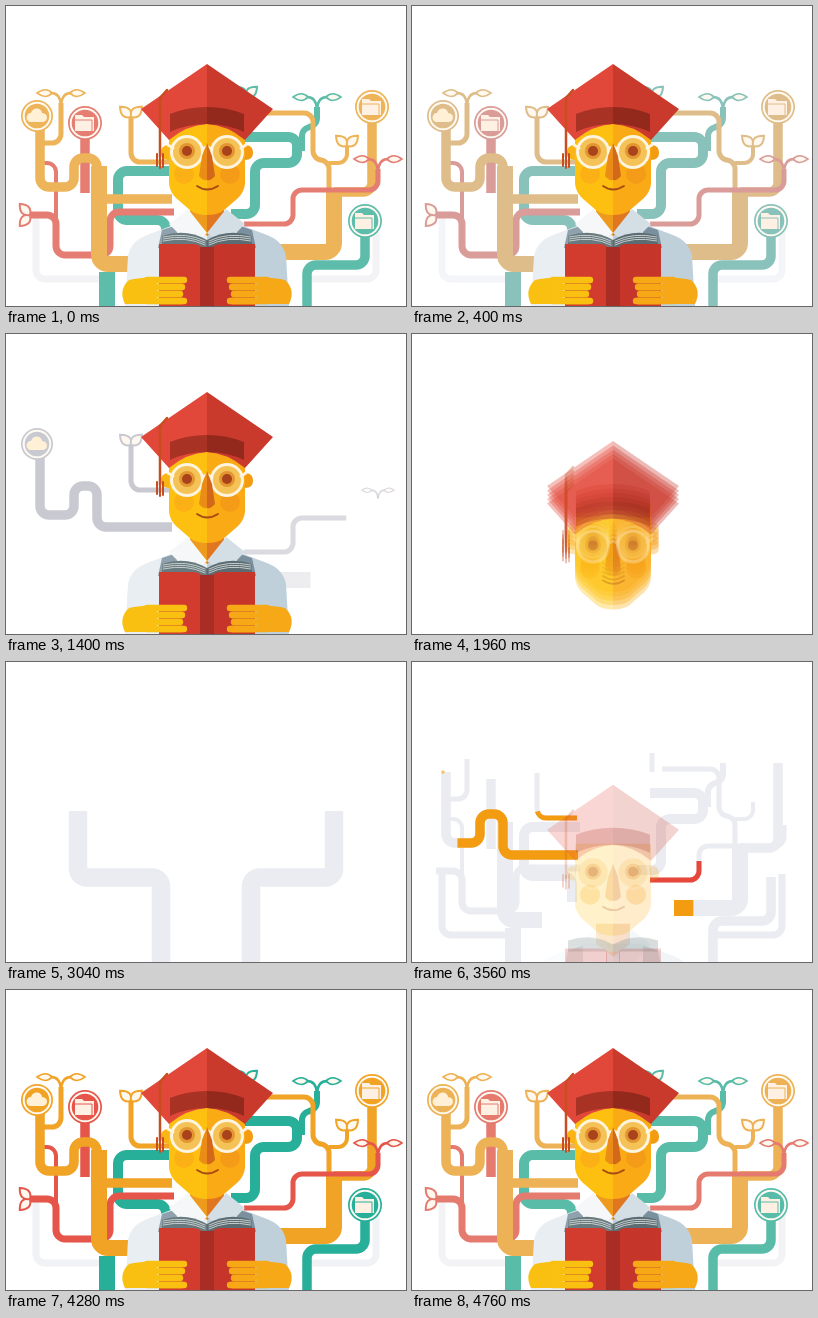
Recreate the animation shown at these times as an HTML page with a canvas. Size 400x300 px, loop 4800 ms.

```html
<!DOCTYPE html>
<html lang="en">
<head>
<meta charset="utf-8">
<title>Learning tree</title>
<style>
html, body { margin: 0; width: 100%; height: 100%; overflow: hidden; background: #fff; }
canvas { display: block; width: 400px; height: 300px; }
</style>
</head>
<body>
<canvas id="stage" width="400" height="300"></canvas>
<script>
const ctx = document.getElementById('stage').getContext('2d');
const LOOP = 4800, HALF = 2400, AXIS = 201;
const PALE = '#ebecf1', GREY = [201, 201, 209], LIGHT = [225, 222, 214];
const THICK = 16, MID = 9.5, THIN = 5;
const hues = { tan: [243, 156, 18], pink: [231, 70, 58], teal: [18, 170, 146] };

const clamp = v => Math.max(0, Math.min(1, v));
const span = (t, a, b) => clamp((t - a) / (b - a));
const easeOut = p => 1 - (1 - p) * (1 - p);
const mix = (a, b, p) => a.map((v, i) => v + (b[i] - v) * p);

// Vivid when grown, washed out by the end of the loop, grey before retracting
function hueAt(name, t) {
  const wash = t < HALF ? 1 : span(t, 4080, LOOP);
  const grey = t < HALF ? span(t, 120, 800) : 0;
  const rgb = mix(mix(hues[name], LIGHT, .36 * wash), GREY, grey);
  return `rgb(${rgb.map(Math.round)})`;
}

// Corners of a right-angled route; the turns alternate between x and y
function route(x, y, ...turns) {
  return [[x, y], ...turns.map((v, i) => i % 2 ? [x, y = v] : [x = v, y])];
}

const pipes = [];
const pipe = (hue, width, cap, ...turns) => pipes.push({ hue, width, cap, points: route(...turns) });

// In order of growth; retraction goes the other way
pipe('tan', MID, 'cloud', 166, 193, 91, 152, 68, 181, 34, 110);
pipe('tan', THIN, 'narrow', 165, 156, 125, 111);
pipe('pink', THIN, 'wide', 238, 218, 287, 184, 372, 163);
pipe('tan', THICK, '', 262, 246, 328, 186);
pipe('tan', THICK, '', 130, 258, 93, 160);
pipe('pink', 7, 'side', 168, 206, 104, 249, 50, 209, 24);
pipe('pink', MID, 'folder', 79, 187, 79, 117);
pipe('teal', 10, '', 160, 240, 160, 214, 112, 165, 168);
pipe('teal', 10, '', 225, 208, 249, 157, 291, 131, 238);
pipe('tan', THIN, 'wide', 34, 137, 55, 97);
pipe('teal', THICK, '', 101, 300, 101, 266);
pipe('pink', 4, '', 50, 214, 50, 157, 36);
pipe('tan', MID, 'folder', 328, 186, 366, 101);
pipe('tan', THIN, '', 323, 200, 323, 154, 307, 107, 250);
pipe('tan', 4, 'narrow', 323, 157, 341, 140);
pipe('teal', MID, 'folder', 301, 300, 301, 259, 359, 215);
pipe('teal', 6, 'wide', 296, 145, 296, 121, 311, 101);
pipe('teal', THIN, 'narrow', 240, 110, 240, 91);

function growth(i, t) {
  if (t >= HALF) return easeOut(span(t, 3440 + i * 32, 3740 + i * 32));
  const end = 960 + 500 * (1 - i / pipes.length) ** 2;
  return 1 - span(t, end, end + 140);
}

function strokeRoute(points, color, width, p) {
  if (p <= 0) return;
  let length = 0;
  ctx.beginPath();
  ctx.moveTo(...points[0]);
  points.slice(1).forEach(([x, y], i) => {
    const [px, py] = points[i], next = points[i + 2];
    length += Math.hypot(x - px, y - py);
    if (next) ctx.arcTo(x, y, ...next, 9);
    else ctx.lineTo(x, y);
  });
  ctx.setLineDash(p < 1 ? [length * p, 2000] : []);
  ctx.strokeStyle = color;
  ctx.lineWidth = width;
  ctx.stroke();
  ctx.setLineDash([]);
}

function shape(fill, d) {
  ctx.fillStyle = fill;
  ctx.fill(new Path2D(d));
}

function line(color, width, d) {
  ctx.strokeStyle = color;
  ctx.lineWidth = width;
  ctx.stroke(new Path2D(d));
}

function disc(x, y, r, fill) {
  ctx.beginPath();
  ctx.arc(x, y, r, 0, Math.PI * 2);
  ctx.fillStyle = fill;
  ctx.fill();
}

// Runs a drawing once per side of the current origin
function mirrored(paint) {
  for (const side of [-1, 1]) {
    ctx.save();
    ctx.scale(side, 1);
    paint(side);
    ctx.restore();
  }
}

const halves = (left, right, d) => mirrored(side => shape(side < 0 ? left : right, d));

function drawLeaves(kind, color) {
  const wide = kind === 'wide', blade = 'M0 0Q6-9 15 0Q6 9 0 0Z';
  if (kind === 'side') ctx.rotate(-Math.PI / 2);
  mirrored(() => {
    if (wide) {
      line(color, 2.5, 'M0 2Q1-10 10-10');
      ctx.translate(9, -10);
      ctx.scale(1, .75);
    } else {
      ctx.rotate(-.75);
    }
    shape('#fff8ee', blade);
    line(color, 2, blade);
  });
}

function drawBadge(icon, color) {
  const r = icon === 'cloud' ? 16 : 17;
  disc(0, 0, r, color);
  disc(0, 0, r - 1.7, '#fffaf2');
  disc(0, 0, r - 3.7, color);
  if (icon === 'cloud') {
    shape('#fff0d6', 'M-7 6C-13 4-10-4-6-3C-4-10 5-8 5-3C12-3 11 6 6 6Z');
  } else {
    shape('#fff0e4', 'M-10-8H-3L-1-6H9V8H-10Z');
    line(color, 1, 'M-10-3H7V8');
  }
}

function drawCap({ cap, hue, points }, p, t) {
  if (!cap || p <= 0) return;
  const badge = cap === 'cloud' || cap === 'folder';
  ctx.save();
  ctx.translate(...points[points.length - 1]);
  if (cap === 'cloud') ctx.translate(-3, 0);
  ctx.scale(p, p);
  (badge ? drawBadge : drawLeaves)(cap, hueAt(hue, t));
  ctx.restore();
}

function drawPipes(t) {
  const order = pipes.map((item, i) => ({ ...item, p: growth(i, t) })).reverse();
  for (const { points, hue, width, p } of order) {
    ctx.globalAlpha = t < HALF ? p : 1;
    strokeRoute(points, hueAt(hue, t), width, p);
  }
  for (const item of order) {
    ctx.globalAlpha = t < HALF ? item.p : 1;
    drawCap(item, t < HALF ? item.p : span(item.p, .6, 1), t);
  }
  ctx.globalAlpha = 1;
}

function drawPale(t) {
  ctx.save();
  if (t >= HALF) {
    ctx.globalAlpha = 1 - span(t, 4080, 4400);
    pipes.forEach(({ points, width }) =>
      strokeRoute(points, PALE, width, easeOut(span(t, 3040, 3540))));
  }
  ctx.translate(200, 0);
  const trunk = easeOut(span(t, 2400, 2960));
  const traces = t < HALF ? 1 : easeOut(span(t, 3120, 3600));
  const lasting = t < HALF ? .6 * (1 - span(t, 300, 1100)) : 1 - .4 * span(t, 3900, 4400);
  mirrored(() => {
    ctx.globalAlpha = 1 - span(t, 3240, 3520);
    if (t >= HALF) strokeRoute(route(45, 300, 45, 215.5, 128, 149), PALE, 18.5, trunk);
    ctx.globalAlpha = lasting;
    strokeRoute(route(100, 273, 170, 212), PALE, 7, traces);
  });
  ctx.restore();
}

function drawBody() {
  halves('#e8eef2', '#bfd0da', 'M0 217H28L60 229Q76 235 79 250L82 300H0Z');
  halves('#8fa1ad', '#7b909e', 'M30 219L45 224L49 242H30Z');
  halves('#ee9a1c', '#e0761f', 'M0 197H17V217L0 230Z');
  halves('#f5f7f8', '#d3dee5', 'M19 203L0 227L16 240L38 218Z');
}

function drawHead() {
  halves('#fbb416', '#f39c12', 'M36 139H40Q46 140 46 147Q46 154 38 154Z');
  halves('#fdc010', '#f9aa14', 'M0 117H38V178Q37 186 31 192L16 205Q10 209 0 209Z');
  mirrored(side => {
    disc(23, 168, 10, side < 0 ? '#fbb016' : '#f49c18');
    disc(20, 146, 15, '#f4c257');
    disc(20, 145, 8, '#e3952f');
    disc(20, 145, 5, '#a8431c');
    line('#fff4dd', 3, 'M4.5 146A15.5 15.5 0 1 1 35.5 146A15.5 15.5 0 1 1 4.5 146M5 143L0 141M34 142L39 139');
  });
  halves('#ea8c17', '#d2691a', 'M0 137L5 150L8 170Q4 175 0 174Z');
  line('#a54b16', 1.8, 'M-10 180Q0 187 11 180');
  // Cap and tassel
  halves('#e2483a', '#c93a2d', 'M0 58L66 103L38 134Q20 119 0 118Z');
  halves('#a83224', '#93291d', 'M0 101Q20 101 37 108V126Q20 118 0 118Z');
  line('#c84d20', 2.5, 'M-40 84L-47 92V151');
  line('#c84d20', 2, 'M-47 149V162M-50 148V160M-44 148V161');
}

function drawBook() {
  halves('#697a7e', '#5c6c72', 'M0 234Q21 222 45 230V241H0Z');
  mirrored(() => {
    for (let y = 231; y < 237; y += 2) line('#c3cccc', 1, `M2 ${y + 4}Q20 ${y - 5} 44 ${y}`);
  });
  halves('#d23c2e', '#c5352a', 'M6 241Q8 238 14 238H48V300H6Z');
  shape('#a92d24', 'M-7 241H7V300H-7Z');
  mirrored(side => {
    const skin = side < 0 ? '#f9c012' : '#f7a816';
    shape(skin, 'M50 271Q70 272 78 274Q89 284 82 298H50Z');
    for (let i = 0; i < 4; i++) {
      const y = 274 + i * 7;
      line(skin, 6.4, `M${23 + i % 3 * 2} ${y}H60`);
      line('#e0881a', .7, `M25 ${y + 3.5}H47`);
    }
  });
}

function drawReader(t) {
  const leaving = t < HALF;
  const p = leaving ? span(t, 1700, 2120) : span(t, 3520, 4080);
  const alpha = leaving ? 1 - span(p, .5, 1) : span(t, 3520, 3700);
  if (!alpha) return;
  const sink = leaving ? 128 * p * p : 75 * (1 - p) ** 2;
  const torso = leaving ? 1 - span(p, .1, .55) : 1;
  ctx.save();
  ctx.lineCap = 'round';
  ctx.translate(AXIS, sink);
  ctx.globalAlpha = alpha * torso;
  drawBody();
  // The head smears downwards as it sinks
  const smears = leaving && p > 0 ? 5 : 1;
  for (let i = 0; i < smears; i++) {
    ctx.globalAlpha = smears > 1 ? alpha * (1 - .55 * span(p, 0, .6)) : alpha;
    drawHead();
    if (i < smears - 1) ctx.translate(0, p * 7);
  }
  ctx.globalAlpha = alpha * torso;
  ctx.translate(0, leaving ? p * 60 : -sink * .25);
  drawBook();
  ctx.restore();
}

function draw(t) {
  ctx.fillStyle = '#fff';
  ctx.fillRect(0, 0, 400, 300);
  drawPale(t);
  drawPipes(t);
  drawReader(t);
}

const began = performance.now();
function tick() {
  const t = (performance.now() - began) % LOOP;
  draw(Math.floor(t / 40) * 40);
  requestAnimationFrame(tick);
}
tick();
</script>
</body>
</html>
```
